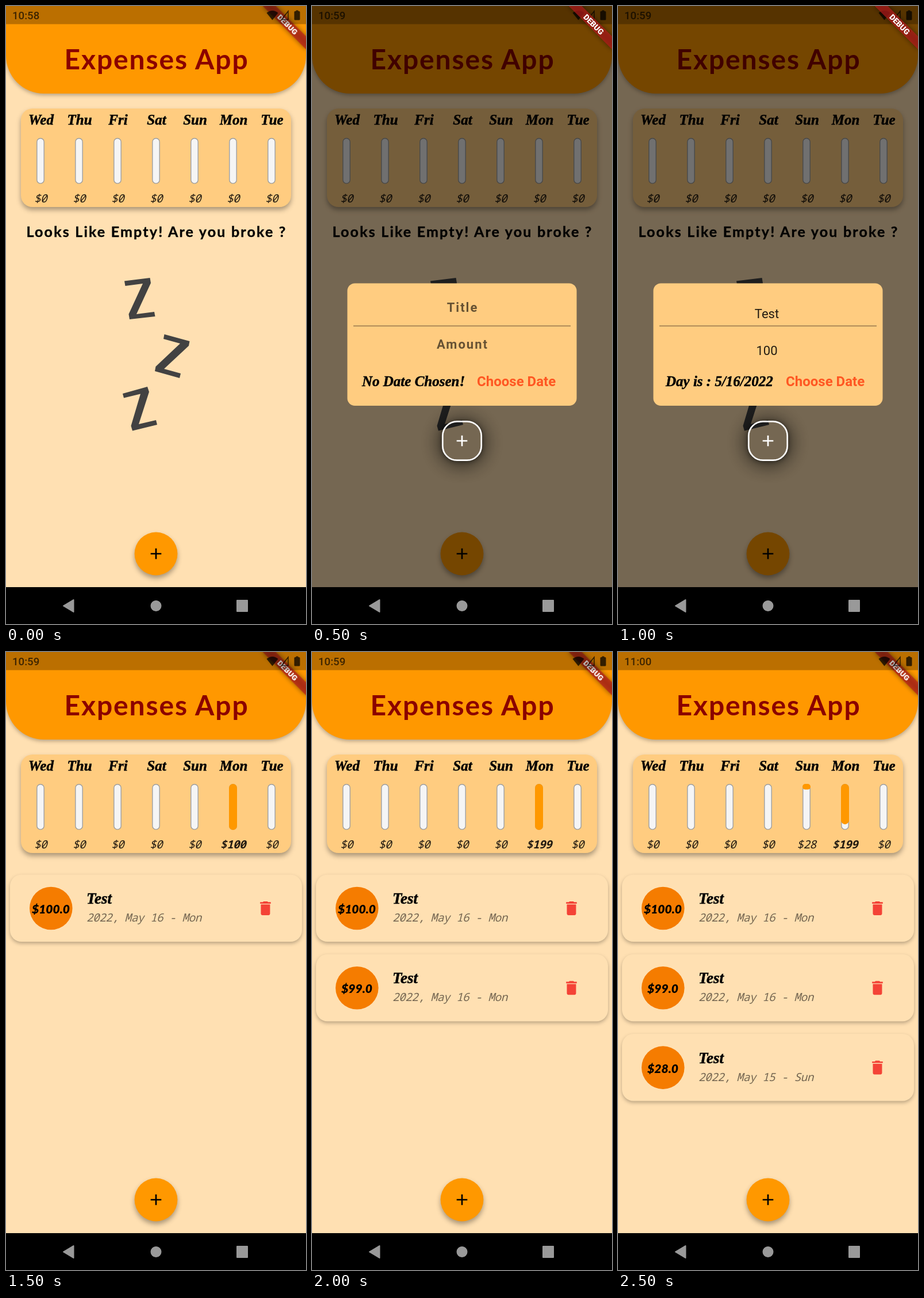
An HTML page that plays this animation: 522x1073 px, repeating every 3 s.

```html
<!DOCTYPE html>
<html lang="en">
<head>
<meta charset="utf-8">
<title>Expenses App</title>
<style>
  html, body { margin: 0; width: 100%; height: 100%; overflow: hidden; background: #000; }
  svg { display: block; width: 522px; height: 1073px; }
  [data-on] { animation: 3s step-end infinite; }
  .title { font: 700 48px Lato, sans-serif; letter-spacing: 1.9px; fill: #8b0000; }
  .note { font: 700 25px Lato, sans-serif; letter-spacing: 2.2px; stroke: #000; stroke-width: .4px; }
  .script { font: italic 700 25px "Liberation Serif", serif; stroke: #000; stroke-width: .5px; }
  .big { font-size: 27px; }
  .mono { font: italic 400 19.5px "Noto Sans Mono", monospace; letter-spacing: -.6px; fill: #000d; }
  .bold { font-weight: 700; }
  .date { fill: #0000008a; }
  .price { font: italic 900 21px Lato, sans-serif; }
  .clock { font: 500 18.6px Roboto, sans-serif; fill: #000a; }
  .hint { font: 700 22px Roboto, sans-serif; letter-spacing: 2px; fill: #0009; }
  .field { font: 400 22px Roboto, sans-serif; fill: #000d; }
  .pick { font: 700 24px Roboto, sans-serif; fill: #ff5722; }
  .debug { font: 900 13.6px Roboto, sans-serif; fill: #fff; }
  .mid { text-anchor: middle; }
  .raised { filter: drop-shadow(0 3px 3px #0004); }
  .high { filter: drop-shadow(0 5px 4.5px #0005); }
  .plus { fill: none; stroke-width: 2.7px; }
</style>
</head>
<body>
<svg viewBox="0 0 522 1073">
  <defs>
    <filter id="soft" x="-100%" y="-100%" width="300%" height="300%"><feGaussianBlur stdDeviation="16"/></filter>
    <filter id="edge" x="-20%" y="-100%" width="140%" height="300%"><feGaussianBlur stdDeviation="4"/></filter>
    <mask id="ring" maskUnits="userSpaceOnUse" x="150" y="640" width="222" height="240">
      <path d="M150 640h222v240h-222z" fill="#fff"/>
      <rect x="227" y="721" width="68" height="68" rx="25"/>
    </mask>
    <g id="banner" transform="translate(522) rotate(45)">
      <rect x="-53" y="37.2" width="106" height="16" fill="#0007" filter="url(#edge)"/>
      <rect x="-53" y="37.2" width="106" height="16" fill="#b71c1c" fill-opacity=".7"/>
      <text class="debug mid" y="50">DEBUG</text>
    </g>
    <path id="bin" d="M6 19c0 1.1.9 2 2 2h8c1.1 0 2-.9 2-2V7H6zM19 4h-3.5l-1-1h-5l-1 1H5v2h14z" fill="#f44336"/>
  </defs>

  <path d="M0 0h522v1010H0z" fill="#ffe0b2"/>
  <path class="raised" d="M0 0h522v86a66 66 0 0 1-66 66H66a66 66 0 0 1-66-66z" fill="#ff9800"/>
  <text class="title mid" x="262" y="109.500">Expenses App</text>

  <rect class="high" x="26" y="178" width="470" height="171" rx="20" fill="#ffcc80"/>
  <g id="week"></g>

  <g data-on="0-2">
    <text class="note mid" x="262" y="400.500">Looks Like Empty! Are you broke ?</text>
    <g fill="#424242">
      <path d="M206 477.500L250.500 472 252 481 227 535 258 531 259.500 539 215 544 213.500 535 238 482 207.500 486z"/>
      <path d="M275.500 570L319.500 582 318 590 275 630 304 638 302 646 259 634 260.500 626 303 586 274 578z"/>
      <path d="M203 673L246 661 249 670 231 726 261 719 263 727 220 737.500 217.500 729 234 673.500 205 680.500z"/>
    </g>
  </g>
  <g id="list"></g>

  <circle class="high" cx="261" cy="951" r="37.400" fill="#ff9800"/>
  <path class="plus" d="M251.700 951h18.600M261 941.700v18.600" stroke="#000"/>

  <use href="#banner" data-on="0-0"/>
  <use href="#banner" data-on="3-5"/>
  <path d="M0 0h522v31.500H0z" fill="#0004"/>
  <text class="clock" x="11" y="23" data-on="0-0">10:58</text>
  <text class="clock" x="11" y="23" data-on="1-4">10:59</text>
  <text class="clock" x="11" y="23" data-on="5-5">11:00</text>
  <g fill="#000b">
    <path d="M463.500 24.500L453.500 12q10-8 20 0z"/>
    <path d="M491 9v14.500h-11.500z" fill="none" stroke="#000b" stroke-width="1.500"/>
    <path d="M504.500 9v-1.500h4V9h1.500q1.500 0 1.500 1.500V23q0 1.500-1.500 1.500h-7q-1.500 0-1.500-1.500V10.500Q501.500 9 503 9z"/>
  </g>

  <g data-on="1-2">
    <path d="M0 0h522v1010H0z" fill="#0000008a"/>
    <use href="#banner"/>
    <g mask="url(#ring)">
      <rect x="219" y="716" width="84" height="84" rx="38" fill="#0008" filter="url(#soft)"/>
      <rect x="226" y="721" width="70" height="70" rx="26" fill="#0007" filter="url(#edge)"/>
    </g>
    <rect x="227.300" y="721.300" width="67.400" height="67.400" rx="25" fill="none" stroke="#fff" stroke-width="2.700"/>
    <path class="plus" d="M251.700 755h18.600M261 745.700v18.600" stroke="#fff"/>
    <rect x="61.500" y="481.500" width="399" height="212.500" rx="13" fill="#ffcc80"/>
    <path d="M72 555.500h378" stroke="#0000006b" stroke-width="1.400"/>
  </g>
  <g data-on="1-1">
    <text class="hint mid" x="262" y="531">Title</text>
    <text class="hint mid" x="262" y="595">Amount</text>
    <text class="script" x="87" y="660">No Date Chosen!</text>
    <text class="pick" x="287" y="660">Choose Date</text>
  </g>
  <g data-on="2-2">
    <text class="field mid" x="259" y="542">Test</text>
    <text class="field mid" x="259" y="606">100</text>
    <text class="script" x="83" y="660">Day is : 5/16/2022</text>
    <text class="pick" x="292" y="660">Choose Date</text>
  </g>

  <path d="M0 1009h522v64H0z"/>
  <g fill="#999" stroke="#999" stroke-width="2" stroke-linejoin="round">
    <path d="M100 1041.500l17.500-10.500v21z"/>
    <circle cx="261" cy="1041.500" r="8.500"/>
    <path d="M402 1032h18v19h-18z"/>
  </g>
</svg>
<script>
  const $ = id => document.getElementById(id);
  const sum = (x, label, on, extra = '') =>
    `<text class="mono mid ${extra}" x="${x}" y="341" data-on="${on}">${label}</text>`;
  const fill = (x, h, on) =>
    `<rect x="${x - 7}" y="229" width="14" height="${h}" rx="${Math.min(7, h / 2)}" fill="#ff9800" data-on="${on}"/>`;

  const BAR = 80, TOTAL = 227;
  const days = ['Wed', 'Thu', 'Fri', 'Sat', 'Sun', 'Mon', 'Tue'];
  const spent = {
    Sun: x => sum(x, '$0', '0-4') + sum(x, '$28', '5-5') + fill(x, BAR * 28 / TOTAL, '5-5'),
    Mon: x => sum(x, '$0', '0-2') + sum(x, '$100', '3-3', 'bold') + sum(x, '$199', '4-5', 'bold')
      + fill(x, BAR, '3-4') + fill(x, BAR * 199 / TOTAL, '5-5')
  };
  $('week').innerHTML = days.map((day, i) => {
    const x = 60 + 67 * i;
    return `<text class="script mid" x="${x + 1}" y="206">${day}</text>
      <rect x="${x - 6.2}" y="229.700" width="12.400" height="78.400" rx="6.200" fill="#f5f5f5" stroke="#9e9e9e" stroke-width="1.400"/>`
      + (spent[day] ? spent[day](x) : sum(x, '$0', '0-5'));
  }).join('');

  const items = [['$100.0', '16 - Mon'], ['$99.0', '16 - Mon'], ['$28.0', '15 - Sun']];
  $('list').innerHTML = items.map(([price, day], i) => `
    <g transform="translate(0 ${138.3 * i})" data-on="${3 + i}-5">
      <rect class="raised" x="7" y="386.500" width="508" height="116.500" rx="20" fill="#ffe0b2"/>
      <circle cx="78.300" cy="445" r="37.300" fill="#f57c00"/>
      <text class="price mid" x="78" y="454">${price}</text>
      <text class="script big" x="140" y="437">Test</text>
      <text class="mono date" x="140" y="468">2022, May ${day}</text>
      <use href="#bin" transform="translate(435.500 429) scale(1.33)"/>
    </g>`).join('');

  // One hard-cut keyframe rule per span of half-second steps.
  const spans = new Set([...document.querySelectorAll('[data-on]')].map(e => e.dataset.on));
  const style = document.createElement('style');
  style.textContent = [...spans].map(span => {
    const [a, b] = span.split('-').map(Number), at = n => `${(n * 100 / 6).toFixed(4)}%`;
    return `@keyframes on${span} { ${a ? '0% { opacity: 0 }' : ''} ${at(a)} { opacity: 1 }
      ${b < 5 ? at(b + 1) + ' { opacity: 0 }' : ''} 100% { opacity: ${b < 5 ? 0 : 1} } }
      [data-on="${span}"] { animation-name: on${span} }`;
  }).join('\n');
  document.head.append(style);
</script>
</body>
</html>
```
